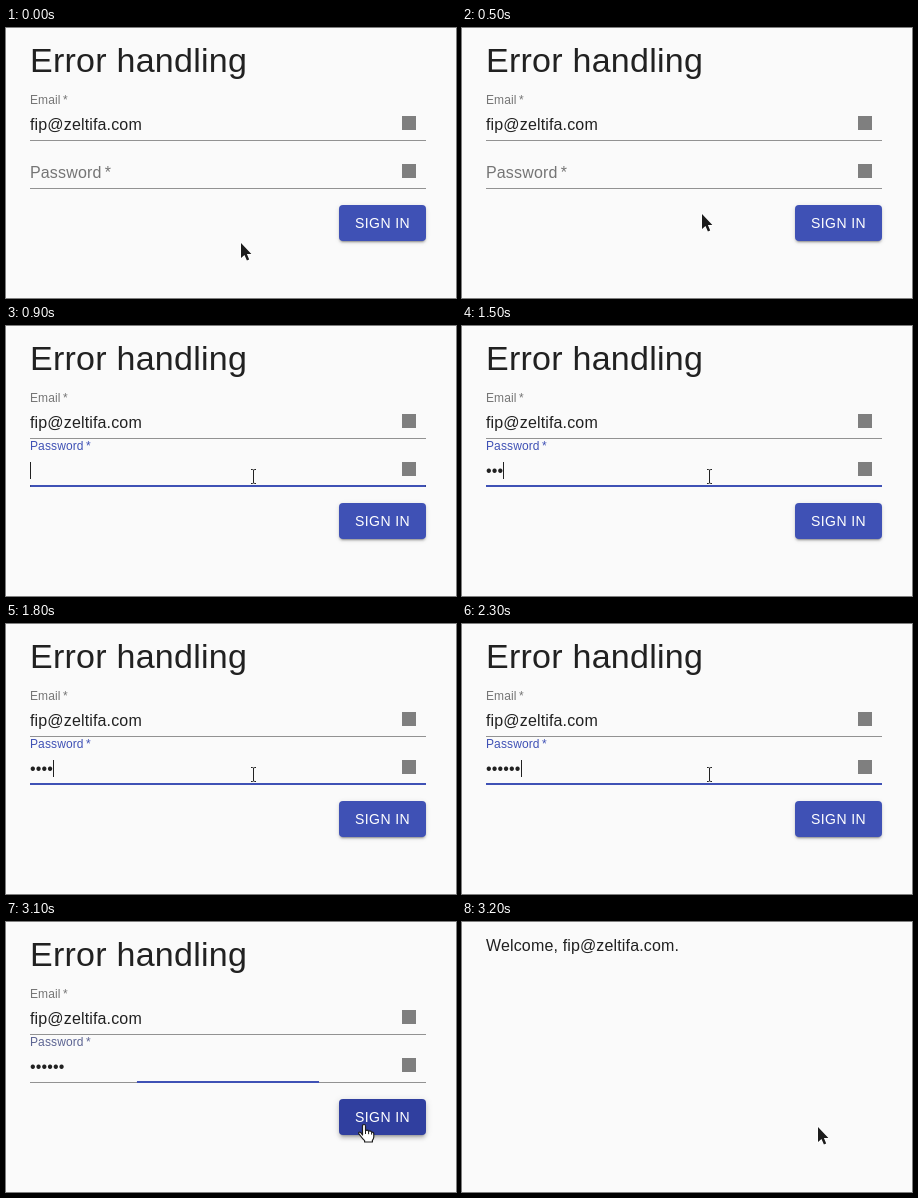
Animation, 450 px wide and 270 px high, one loop 4600 ms. Source, as an HTML page:

```html
<!DOCTYPE html>
<html lang="en">
<head>
<meta charset="utf-8">
<title>Error handling</title>
<style>
  html, body { margin: 0; width: 100%; height: 100%; overflow: hidden; background: #fafafa; }
  svg { position: absolute; left: 0; top: 0; }
  text { font: 16px "Liberation Sans", Arial, sans-serif; letter-spacing: .00938em; fill: #212121; white-space: pre; }
  .title { font-size: 34px; letter-spacing: .00735em; }
  .label { fill: #757575; }
  .action { font-size: 14px; letter-spacing: .02857em; fill: #fff; }
  #button { position: absolute; left: 333px; top: 177px; width: 87px; height: 36px; border-radius: 4px; }
</style>
</head>
<body>
<div id="button"></div>
<svg width="450" height="270" viewBox="0 0 450 270">
  <g id="form">
    <text class="title" x="24" y="44">Error handling</text>

    <text class="label" transform="translate(24 76) scale(.75)">Email&#8201;*</text>
    <text x="24" y="102">fip@zeltifa.com</text>
    <rect x="396" y="88" width="14" height="14" fill="#7f7f7f"/>
    <rect x="24" y="112" width="396" height="1" fill="#929292"/>

    <text class="label" id="label">Password&#8201;*</text>
    <text id="dots" x="24" y="150"></text>
    <rect id="caret" y="136" width="1" height="17" fill="#212121"/>
    <rect id="icon" x="396" y="136" width="14" height="14"/>
    <rect id="line" x="24" width="396"/>
    <rect id="focusLine" y="159" height="2" fill="#3f51b5"/>

    <text class="action" x="349.1" y="200">SIGN IN</text>
  </g>
  <text id="welcome" x="24" y="29">Welcome, fip@zeltifa.com.</text>

  <g id="arrow">
    <path d="M0 0V15L3.5 11.9 5.9 17.4 8.2 16.4 5.9 11H10.4Z" fill="#1c1c1c" stroke="#fff" stroke-width="1.6" stroke-linejoin="round" paint-order="stroke"/>
  </g>
  <g id="beam" fill="none" stroke-linecap="square">
    <path d="M-2 -6.5H-1Q0 -6.5 0 -5.5V6.5Q0 7.5 -1 7.5H-2M2 -6.5H1Q0 -6.5 0 -5.5M0 6.5Q0 7.5 1 7.5H2" transform="translate(-.5 0)" stroke="#222"/>
  </g>
  <g id="hand">
    <path d="M-1.5 10V1.2Q-1.5 -.5 0 -.5T1.5 1.2V5.6Q3.8 4.6 4.6 6.2 6.8 5.4 7.6 7.1 9.8 6.8 9.8 9V12Q9.6 14 8.4 15.4V17H.6V15.6Q-1.5 13.8 -3 11.5L-5.3 8.6Q-5.6 7 -4 7.1 -3 7.3 -1.5 10Z" fill="#fff" stroke="#1c1c1c" stroke-width="1.2" stroke-linejoin="round"/>
    <path d="M1.5 5.6V9M4.6 6.2V9.2M7.6 7.1V9.6" fill="none" stroke="#1c1c1c"/>
  </g>
</svg>
<script>
const LOOP = 4600, STEP = 100;
const FOCUS = 710, HOVER = 2580, PRESS = 3040, BLUR = 3055, DONE = 3200;
const KEYS = [1300, 1400, 1500, 1800, 2000, 2300];
const GREY = [117, 117, 117], INDIGO = [63, 81, 181], DARK_INDIGO = [48, 63, 159];

// time, x, y of the pointer
const POINTER = [
  [200, 235, 215], [300, 235, 214], [400, 236, 206], [500, 240, 186], [600, 245, 156], [700, 248, 150],
  [2300, 248, 150], [2400, 258, 165], [2500, 281, 190], [2600, 308, 206],
  [2700, 330, 205], [2800, 346, 204], [2900, 358, 203]
];

// resting and pressed shadows: y, blur, spread, opacity
const SHADOWS = [
  [[3, 1, -2, .2], [5, 5, -3, .2]],
  [[2, 2, 0, .14], [8, 10, 1, .14]],
  [[1, 5, 0, .12], [3, 14, 2, .12]]
];

const el = Object.fromEntries([...document.querySelectorAll("[id]")].map(e => [e.id, e]));
const set = (e, attrs) => Object.entries(attrs).forEach(([k, v]) => e.setAttribute(k, v));
const show = (e, on) => { e.style.display = on ? "" : "none"; };
const clamp = v => Math.min(1, Math.max(0, v));
const lerp = (a, b, p) => a + (b - a) * p;
const mix = (a, b, p) => `rgb(${a.map((v, i) => Math.round(lerp(v, b[i], p)))})`;

function bezier(x1, y1, x2, y2) {
  const curve = (a, b, u) => 3 * a * u * (1 - u) ** 2 + 3 * b * u * u * (1 - u) + u ** 3;
  return x => {
    let lo = 0, hi = 1;
    for (let i = 0; i < 24; i++) {
      const mid = (lo + hi) / 2;
      if (curve(x1, x2, mid) < x) lo = mid; else hi = mid;
    }
    return curve(y1, y2, hi);
  };
}
const easeOut = bezier(0, 0, .2, 1);
const easeInOut = bezier(.4, 0, .2, 1);
const progress = (t, start, length, ease) => ease(clamp((t - start) / length));

function pointerAt(t) {
  if (t >= DONE) return [356, 205];
  const next = POINTER.findIndex(k => k[0] > t);
  if (next < 0) return POINTER.at(-1).slice(1);
  if (next === 0) return POINTER[0].slice(1);
  const [a, b] = [POINTER[next - 1], POINTER[next]];
  const p = (t - a[0]) / (b[0] - a[0]);
  return [lerp(a[1], b[1], p), lerp(a[2], b[2], p)];
}

function drawField(t) {
  const focus = progress(t, FOCUS, 200, easeOut);
  const blur = progress(t, BLUR, 200, easeOut);
  const active = focus * (1 - blur);
  const hovered = t >= 600 && t < 2500;
  const typed = KEYS.filter(k => k <= t).length;

  set(el.label, { transform: `translate(24 ${lerp(150, 124, focus)}) scale(${lerp(1, .75, focus)})` });
  el.label.style.fill = mix(GREY, INDIGO, active);
  el.dots.textContent = "•".repeat(typed);
  set(el.caret, { x: Math.round(24 + typed * 5.75) });
  show(el.caret, t >= FOCUS && t < 2900);
  set(el.icon, { fill: t >= 600 && t < 900 ? "#000" : "#7f7f7f" });
  set(el.line, hovered ? { y: 159, height: 2, fill: "#212121" } : { y: 160, height: 1, fill: "#929292" });
  set(el.focusLine, { x: 222 - 198 * active, width: 396 * active });
}

function drawButton(t) {
  const pressed = progress(t, PRESS, 250, easeInOut);
  el.button.style.background = mix(INDIGO, DARK_INDIGO, progress(t, HOVER, 250, easeInOut));
  el.button.style.boxShadow = SHADOWS.map(([rest, down]) => {
    const [y, blur, spread, alpha] = rest.map((v, i) => lerp(v, down[i], pressed));
    return `0 ${y}px ${blur}px ${spread}px rgba(0,0,0,${alpha})`;
  }).join();
}

function drawPointer(t) {
  const [x, y] = pointerAt(t);
  const kind = t >= 600 && t < 2500 ? "beam" : t >= 2700 && t < DONE ? "hand" : "arrow";
  for (const name of ["arrow", "beam", "hand"]) show(el[name], name === kind);
  set(el[kind], { transform: `translate(${Math.round(x)} ${Math.round(y)})` });
}

function draw(time) {
  const t = Math.floor(time % LOOP / STEP) * STEP;
  const done = t >= DONE;
  show(el.form, !done);
  show(el.button, !done);
  show(el.welcome, done);
  drawField(t);
  drawButton(t);
  drawPointer(t);
}

const start = performance.now();
function tick() {
  draw(performance.now() - start);
  requestAnimationFrame(tick);
}
tick();
</script>
</body>
</html>
```
